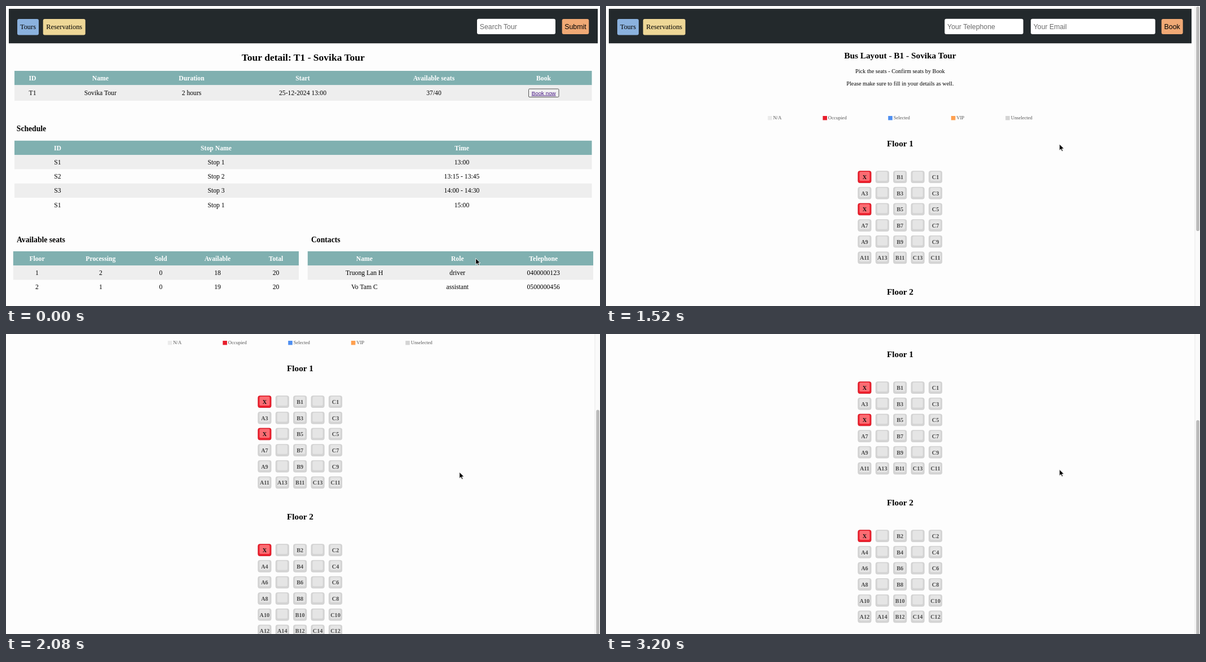
An HTML page that plays this animation: 1053x532 px, repeating every 3680 ms.

```html
<!DOCTYPE html>
<html lang="en">
<head>
<meta charset="utf-8">
<title>Tour booking</title>
<style>
html, body { margin: 0; width: 100%; height: 100%; overflow: hidden; background: #fdfdfd; }
svg { display: block; width: 100%; height: 100%; }
text { font-family: "Liberation Serif", Times, serif; }
.sans { font-family: "Liberation Sans", Arial, sans-serif; }
.b { font-weight: bold; }
.mid { text-anchor: middle; }
</style>
</head>
<body>
<svg id="stage" viewBox="0 0 1053 532" xmlns="http://www.w3.org/2000/svg"></svg>
<script>
const LOOP = 3680, STEP = 80;
const TEAL = '#80b0b0', STRIPE = '#eeeeee';

const rect = (x, y, w, h, fill, rx = 0, extra = '') =>
  `<rect x="${x}" y="${y}" width="${w}" height="${h}" rx="${rx}" fill="${fill}" ${extra}/>`;
const text = (s, x, y, size, cls = '', fill = '#000', extra = '') =>
  `<text x="${x}" y="${y}" font-size="${size}" class="${cls}" fill="${fill}" ${extra}>${s}</text>`;

function table(x, w, y, cols, rows, heights) {
  let out = '';
  rows.forEach((row, i) => {
    const h = heights[i];
    const fill = i === 0 ? TEAL : i % 2 ? STRIPE : 'none';
    out += rect(x, y, w, h, fill);
    row.forEach((s, c) => {
      out += text(s, cols[c], y + h / 2 + 4.1, 11.68, i ? 'mid' : 'mid b', i ? '#000' : '#fff');
    });
    y += h;
  });
  return out;
}

const button = (s, x, y, w, h, fill, cls) =>
  rect(x, y, w, h, fill, 3) + text(s, x + w / 2, 41, 12.4, 'mid ' + cls);
const input = (s, x, w) =>
  rect(x, 22.7, w, 27.2, '#fff', 3) + text(s, x + 4.8, 41, 12.3, 'sans', '#6c6c6c');

const navbar = (w, form) =>
  rect(5, 6.5, w, 61, '#000', 0, 'opacity=".12"') +
  rect(5, 5, w, 61, '#23292c') +
  button('Tours', 20, 23, 38, 28.5, '#8bb2de', '') +
  button('Reservations', 65.7, 23, 75, 28.5, '#eed797', '') + form;

function detailPage() {
  const form = input('Search Tour', 835, 139) +
    button('Submit', 985.7, 23, 47.6, 27, '#f0a975', 'sans');
  return navbar(1044, form) +
    text('Tour detail: T1 - Sovika Tour', 526.8, 96.5, 17.5, 'mid b') +
    table(15, 1023.5, 115, [47, 167.3, 329, 526, 758.5, 953], [
      ['ID', 'Name', 'Duration', 'Start', 'Available seats', 'Book'],
      ['T1', 'Sovika Tour', '2 hours', '25-12-2024 13:00', '37/40']
    ], [25.3, 27.8]) +
    rect(926.5, 147, 53.5, 14.5, '#f1f1f1', 1.5, 'id="book" stroke="#555" stroke-width="1"') +
    text('Book now', 953.2, 157.6, 9.8, 'sans mid', '#4a1b86', 'text-decoration="underline"') +
    text('Schedule', 18.8, 221.5, 13.67, 'b') +
    table(15, 1023.5, 238.8, [91.5, 372.5, 808], [
      ['ID', 'Stop Name', 'Time'],
      ['S1', 'Stop 1', '13:00'],
      ['S2', 'Stop 2', '13:15 - 13:45'],
      ['S3', 'Stop 3', '14:00 - 14:30'],
      ['S1', 'Stop 1', '15:00']
    ], Array(5).fill(25.3)) +
    text('Available seats', 19, 418.5, 13.67, 'b') +
    table(12.8, 506.2, 435, [55, 167.8, 274.5, 375, 478.5], [
      ['Floor', 'Processing', 'Sold', 'Available', 'Total'],
      ['1', '2', '0', '18', '20'],
      ['2', '1', '0', '19', '20']
    ], Array(3).fill(25.3)) +
    text('Contacts', 541, 418.5, 13.67, 'b') +
    table(534.8, 506.2, 435, [635.3, 800.3, 952.7], [
      ['Name', 'Role', 'Telephone'],
      ['Truong Lan H', 'driver', '0400000123'],
      ['Vo Tam C', 'assistant', '0500000456']
    ], Array(3).fill(25.3)) +
    rect(0, 530.3, 130, 3, '#ececec', 2, 'id="status"');
}

function seat(label, cx, cy) {
  const taken = label === 'X';
  const [edge, base, top] = taken ? ['#c8141f', '#ee1f2d', '#fb6c72'] : ['#cecece', '#d4d4d4', '#e5e5e5'];
  return rect(cx - 11.6, cy - 10.4, 23.2, 20.8, base, 3, `stroke="${edge}" stroke-width=".8"`) +
    rect(cx - 9, cy - 9.2, 18, 16, top, 2) +
    text(label, cx, cy + 4, 10.22, 'mid b', taken ? '#111' : '#4c4c4c');
}

// Odd seat numbers on floor 1, even ones on floor 2.
function floor(n, y, taken) {
  let out = text('Floor ' + n, 521.4, y, 15.33, 'mid b');
  for (let r = 0; r < 6; r++) {
    const num = 2 * r + n, last = r === 5;
    const labels = ['A' + num, last ? 'A' + (num + 2) : '', 'B' + num, last ? 'C' + (num + 2) : '', 'C' + num];
    if (taken.includes(num)) labels[0] = 'X';
    labels.forEach((s, c) => { out += seat(s, 458.4 + 31.4 * c, y + 54.5 + 28.65 * r); });
  }
  return out;
}

function seatPage() {
  const form = input('Your Telephone', 600.3, 139.4) + input('Your Email', 753, 220.7) +
    button('Book', 984.7, 23, 38, 27, '#f0a975', 'sans');
  const legend = [
    ['N/A', 286.8, '#ebebeb'], ['Occupied', 384.3, '#e81e2c'], ['Selected', 500.2, '#4f8ff0'],
    ['VIP', 611.8, '#ffa04f'], ['Unselected', 708.2, '#d4d4d4']
  ];
  return navbar(1033, form) +
    text('Bus Layout - B1 - Sovika Tour', 521.4, 92.7, 15.33, 'mid b') +
    text('Pick the seats - Confirm seats by Book', 521.4, 118.8, 10.22, 'mid') +
    text('Please make sure to fill in your details as well.', 521.4, 140.8, 10.22, 'mid') +
    legend.map(([s, x, fill]) => rect(x, 195, 7.6, 7.4, fill) + text(s, x + 9.5, 201.4, 8.6, '', '#555')).join('') +
    floor(1, 248.6, [1, 5]) + floor(2, 511.6, [2]);
}

const stage = document.getElementById('stage');
stage.innerHTML = rect(0, 0, 1053, 532, '#fdfdfd') +
  `<g id="detail">${detailPage()}</g>` +
  `<g id="seats"><g id="content">${seatPage()}</g>` +
  rect(1043.5, 0, 10, 532, '#fafafa') + rect(1043.5, 0, 1, 532, '#e9e9e9') +
  rect(1046.3, 1, 5.6, 398, '#bababa', 2.8, 'id="thumb"') + '</g>' +
  '<path id="cursor" d="M0 0V11.2L2.6 8.8L4.4 12.8L6.3 12L4.6 8.1H8.2Z" fill="#000" stroke="#fff" stroke-width=".9" stroke-linejoin="round"/>';

const el = id => document.getElementById(id);
const [detail, seats, content, thumb, cursor, book, status] =
  ['detail', 'seats', 'content', 'thumb', 'cursor', 'book', 'status'].map(el);
const show = (node, on) => node.setAttribute('visibility', on ? 'visible' : 'hidden');
const move = (node, x, y) => node.setAttribute('transform', `translate(${x} ${y})`);

const smooth = p => p * p * (3 - 2 * p);
const linear = p => p;

// Keys are [time, value, ...] rows.
function track(keys, t, ease) {
  let i = keys.findIndex(k => k[0] > t);
  if (i < 0) return keys[keys.length - 1].slice(1);
  if (i === 0) return keys[0].slice(1);
  const a = keys[i - 1], b = keys[i];
  const p = ease((t - a[0]) / (b[0] - a[0]));
  return a.slice(1).map((v, j) => v + (b[j + 1] - v) * p);
}

const POINTER = [
  [0, 832.7, 447.5], [560, 969.6, 153], [960, 969.6, 153],
  [1440, 803.8, 245], [2800, 803.8, 245], [3200, 803.8, 240.3]
];
const SCROLL = [
  [1520, 0], [1600, 10], [1680, 40], [1760, 77], [1840, 110], [1920, 138], [2000, 162],
  [2080, 183], [2160, 195], [2240, 203], [2320, 206.5], [2480, 209.5], [2640, 210.5],
  [2800, 210.5], [3200, 208]
];
const LOADED = 960, SCROLL_END = 208;

function draw(t) {
  const [x, y] = track(POINTER, t, smooth);
  const [s] = track(SCROLL, t, linear);
  const loaded = t >= LOADED;
  show(detail, !loaded);
  show(seats, loaded);
  show(status, !loaded && t >= 720);
  book.setAttribute('fill', t >= 560 ? '#dfdfdf' : '#f1f1f1');
  move(content, 0, -s);
  move(thumb, 0, 0.73 * Math.min(s, SCROLL_END));
  move(cursor, x, y);
}

function tick() {
  const t = performance.now() % LOOP;
  draw(Math.floor(t / STEP) * STEP);
  requestAnimationFrame(tick);
}
tick();
</script>
</body>
</html>
```
